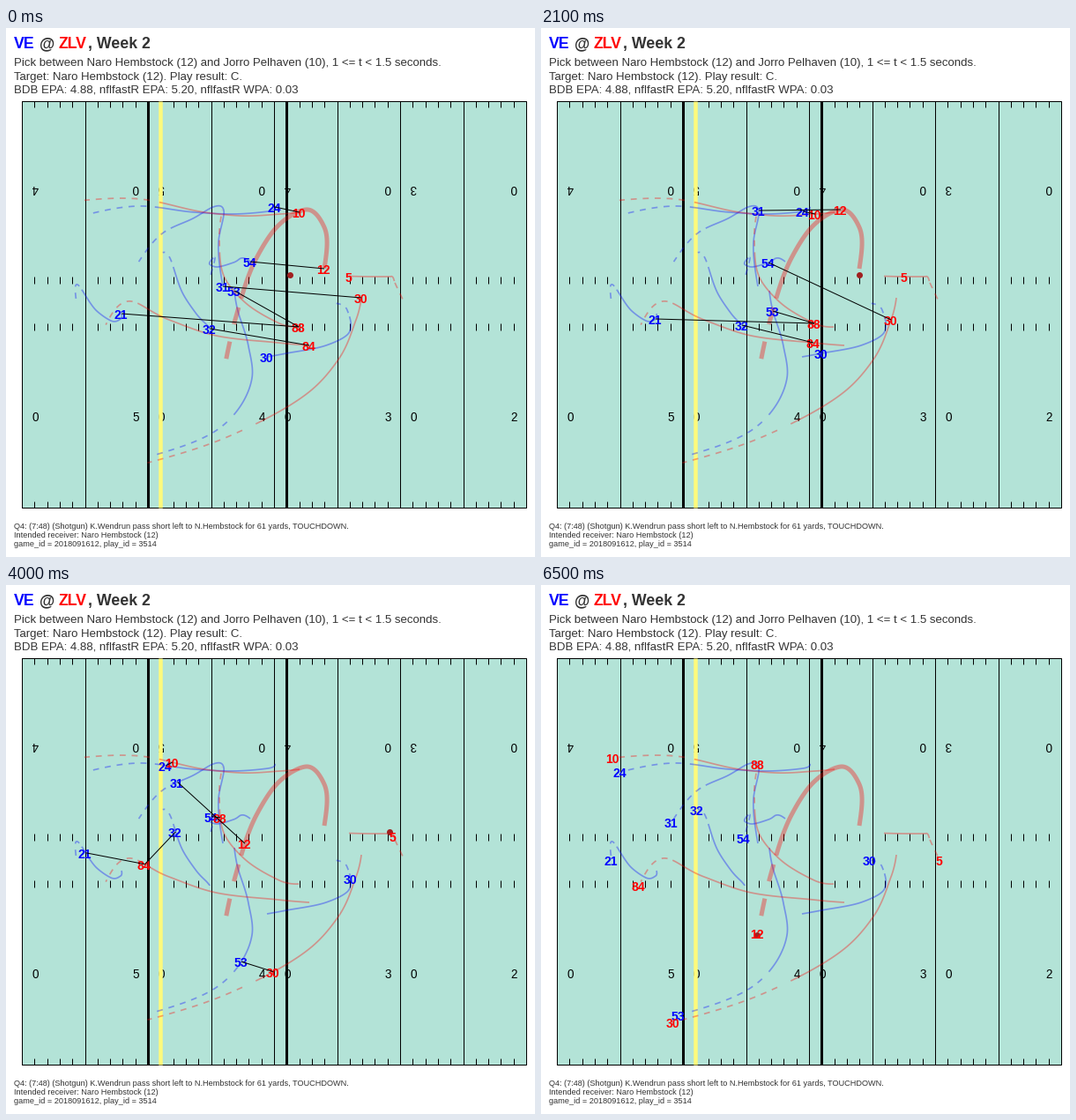
These frames come from a looping animation (600x600 px, 6.6 s). A matplotlib script:

```python
import numpy as np
import matplotlib.pyplot as plt
from matplotlib.animation import FuncAnimation
from matplotlib.patches import Rectangle

SIZE, DPI = 600, 100
FRAMES, STEP = 66, 100
PX = 72 / DPI
LEFT, RIGHT, TOP, BOTTOM = 18, 590, 82.5, 543.5
YARD = (RIGHT - LEFT) / 40
BLUE, RED, INK = "#0000ff", "#ff0000", "#333333"
THROW, END = 4.2, 5.5
KEYS = [1.2, 2.1, 2.9, 3.5, 4.5, END]  # seconds at each waypoint, from the snap

plt.rcParams["font.family"] = "Liberation Sans"
fig = plt.figure(figsize=(SIZE / DPI, SIZE / DPI), dpi=DPI, facecolor="white")
ax = fig.add_axes([0, 0, 1, 1])
ax.set(xlim=(0, SIZE), ylim=(SIZE, 0))
ax.axis("off")


def write(x, y, s, size, color=INK, **kw):
    return ax.text(x, y, s, fontsize=size * PX, color=color, **kw)


def stroke(xs, ys, color="black", width=1.0, **kw):
    return ax.plot(xs, ys, color=color, lw=width * PX,
                   solid_capstyle="butt", dash_capstyle="butt", **kw)[0]


class Player:
    """A jersey number that runs a smooth route through a few waypoints."""

    def __init__(self, number, color, *route, start=None, width=1.7):
        moving = start is not None
        self.keys = np.array([0] * moving + KEYS)
        self.points = np.array([start] * moving + list(route), float)
        self.speed = np.gradient(self.points, self.keys, axis=0)
        self.speed[0] = 1.5 * self.speed[0] - 0.5 * self.speed[1] if moving else 0
        self.speed[-1] = 1.5 * self.speed[-1] - 0.5 * self.speed[-2]
        for t0, t1, style in ((0, THROW, "-"), (THROW + 0.15, END - 0.1, (0, (4, 4)))):
            x, y = self.at(np.linspace(t0, t1, 120))
            stroke(x, y, color, width, alpha=0.35, ls=style, zorder=4)
        self.label = write(0, 0, number, 14, color, weight="bold",
                           ha="center", va="center", zorder=6)

    def at(self, t):
        k, p, m = self.keys, self.points.T, self.speed.T
        t = np.clip(t, k[0], END)
        i = np.clip(np.searchsorted(k, t, side="right") - 1, 0, len(k) - 2)
        h = k[i + 1] - k[i]
        u = (t - k[i]) / h
        return ((1 + 2 * u) * (1 - u) ** 2 * p[:, i] + u * (1 - u) ** 2 * h * m[:, i]
                + u * u * (3 - 2 * u) * p[:, i + 1] + u * u * (u - 1) * h * m[:, i + 1])

    def move(self, t):
        x, y = self.at(t)
        self.label.set_position((x - 1, y + 2))


def draw_field():
    ax.add_patch(Rectangle((LEFT, TOP), RIGHT - LEFT, BOTTOM - TOP,
                           fc="#b3e3d7", ec="black", lw=PX, zorder=1))
    for k in range(40):
        x = LEFT + k * YARD
        if k % 5 == 0:
            stroke([x, x], [TOP, BOTTOM], zorder=2)
        for y0, y1 in ((TOP, 90), (282, 290), (335, 343), (537, BOTTOM)):
            stroke([x, x], [y0, y1], zorder=2)
    for k in range(0, 41, 10):
        tens = str(5 - abs(k - 10) // 10)
        for side, low, high in ((-1, tens, "0"), (1, "0", tens)):
            x = LEFT + (k + side) * YARD + 0.5
            if LEFT < x < RIGHT:
                place = dict(color="black", ha="center", va="center", zorder=2.5)
                write(x, 442, low, 13.5, **place)
                write(x, 182, high, 13.5, rotation=180, **place)
    for x, color, width in ((161, "black", 3), (318, "black", 3), (175, "#fdfa7b", 4.5)):
        stroke([x, x], [TOP, BOTTOM], color, width, zorder=3)


def draw_text():
    x = 9
    for word, color, gap in (("VE", BLUE, 5), ("@", INK, 5), ("ZLV", RED, 1),
                             (", Week 2", INK, 0)):
        t = write(x, 23, word, 17.8, color, weight="bold")
        x += t.get_window_extent().width + gap
    blocks = (
        (43.5, 15, 13.3, (
            "Pick between Naro Hembstock (12) and Jorro Pelhaven (10), 1 <= t < 1.5 seconds.",
            "Target: Naro Hembstock (12). Play result: C.",
            "BDB EPA: 4.88, nflfastR EPA: 5.20, nflfastR WPA: 0.03")),
        (567.5, 10.5, 9.1, (
            "Q4: (7:48) (Shotgun) K.Wendrun pass short left to N.Hembstock for 61 yards, TOUCHDOWN.",
            "Intended receiver: Naro Hembstock (12)",
            "game_id = 2018091612, play_id = 3514")),
    )
    for y, leading, size, lines in blocks:
        for i, line in enumerate(lines):
            write(9, y + leading * i, line, size)


draw_field()
draw_text()

b24 = Player("24", BLUE, (305, 203), (297, 208), (254, 211), (214, 209), (150, 202), (90, 212))
b54 = Player("54", BLUE, (267, 261), (258, 266), (239, 271), (231, 268), (237, 261), (230, 287),
             start=(277, 265))
b31 = Player("31", BLUE, (241, 243), (247, 207), (235, 203), (214, 215), (176, 234), (148, 269),
             start=(246, 293))
b53 = Player("53", BLUE, (259, 298), (263, 321), (275, 361), (279, 397), (242, 454), (156, 488))
b32 = Player("32", BLUE, (231, 341), (228, 337), (215, 323), (201, 302), (186, 261), (177, 255))
b21 = Player("21", BLUE, (131, 324), (130, 330), (119, 332), (103, 321), (81, 291), (80, 312))
b30 = Player("30", BLUE, (296, 373), (318, 369), (363, 360), (387, 348), (387, 320), (373, 312))
r10 = Player("10", RED, (333, 209), (311, 211), (266, 213), (225, 209), (152, 194), (82, 196))
r12 = Player("12", RED, (361, 226), (340, 206), (306, 227), (284, 261), (261, 327), (246, 395),
             start=(361, 273), width=5)
r5 = Player("5", RED, (389, 281.5), (412, 282), (434, 282), (438, 282), (442, 291), (452, 312))
r30 = Player("30", RED, (403, 306), (397, 331), (377, 376), (346, 411), (253, 463), (150, 496))
r88 = Player("88", RED, (332, 339), (310, 335), (272, 312), (250, 287), (242, 241), (246, 203))
r84 = Player("84", RED, (344, 360), (309, 357), (234, 348), (185, 331), (138, 310), (111, 341))
players = [b24, b54, b31, b53, b32, b21, b30, r10, r12, r5, r30, r88, r84]

ball = ax.plot([], [], "o", ms=7 * PX, mew=0, color="#a02020", zorder=5)[0]
links = [stroke([], [], zorder=7) for _ in range(6)]


def ball_at(t):
    """Snap and drop back, then a throw that slows down on its way to the catch."""
    x = np.interp(t, [0.8, 2.1, 2.9, 3.5, THROW], [322, 361, 411, 432, 436])
    u = np.clip((t - THROW) / (END - THROW), 0, 1)
    flown = 1 - (1 - u) ** 1.7
    return x + (244.5 - x) * flown, 280 + 117 * flown


def coverage(t):
    """Who guards whom until the throw."""
    if t >= THROW:
        return []
    return [(b24, r10), (b32, r84),
            (b31, r30 if t < 0.7 else r12),
            (b54, r12 if t < 0.7 else r30 if t < 2.5 else r88),
            (b53, r88 if t < 2.5 else r30),
            (b21, r88 if t < 2.3 else r84)]


def draw(frame):
    t = min(frame * STEP / 1000, END)
    for p in players:
        p.move(t)
    x, y = ball_at(t)
    ball.set_data([x], [y])
    for link in links:
        link.set_data([], [])
    for link, (a, b) in zip(links, coverage(t)):
        link.set_data(*zip(a.at(t), b.at(t)))
    return [p.label for p in players] + links + [ball]


anim = FuncAnimation(fig, draw, frames=FRAMES, interval=STEP, repeat=True,
                     repeat_delay=0, blit=False)
plt.show()
```
